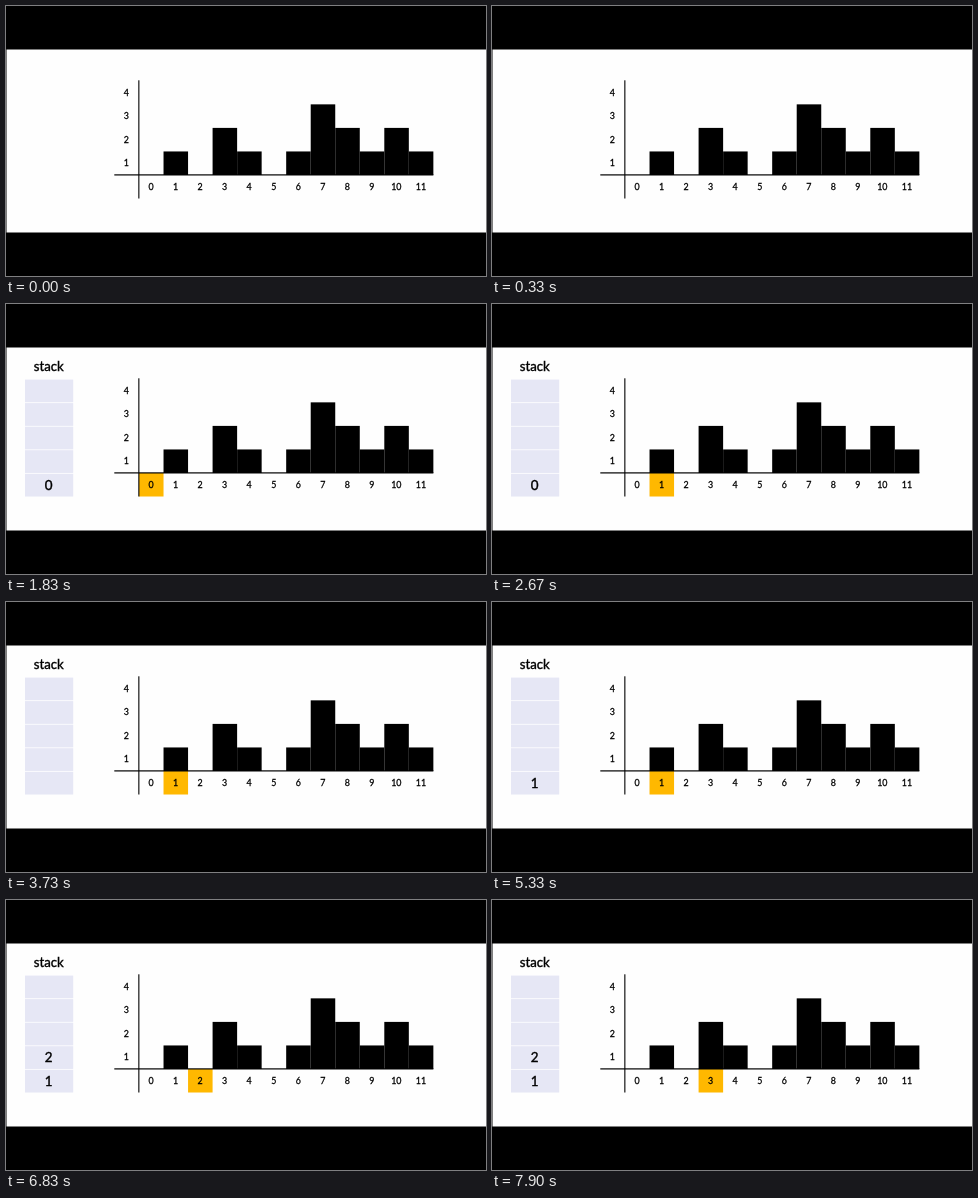
Recreate the animation shown at these times as an HTML page with a canvas. Size 480 px wide and 270 px high, loop 8 s.

```html
<!DOCTYPE html>
<html lang="en">
<head>
<meta charset="utf-8">
<style>
  html, body { margin: 0; width: 100%; height: 100%; overflow: hidden; background: #000; }
  canvas { display: block; }
</style>
</head>
<body>
<canvas id="stage" width="480" height="270"></canvas>
<script>
const ctx = document.getElementById('stage').getContext('2d');
const LOOP = 8000;
const CELL = 24.53, UNIT = 23.55, LEFT = 133, BASE = 169, FOOT = 192.5;
const heights = Array.from('010210132121', Number);
const beats = [500, 1630, 2400, 3570, 4730, 5830, 6830, 7900];

// Walks the columns with a stack of non-rising heights, one state per action
function* walk() {
  const stack = [];
  for (let i = 0; i < heights.length; i++) {
    yield { active: i, stack: [...stack] };
    while (stack.length && heights[stack.at(-1)] < heights[i]) {
      stack.pop();
      yield { active: i, stack: [...stack] };
    }
    stack.push(i);
    yield { active: i, stack: [...stack] };
  }
}
const states = [...walk()];

function box(x0, y0, x1, y1, color) {
  ctx.fillStyle = color;
  ctx.fillRect(x0, y0, x1 - x0, y1 - y0);
}

// The thin outline gives the text a medium weight
function label(text, x, y, size) {
  ctx.font = `${size}px Lato, Carlito, sans-serif`;
  ctx.fillStyle = ctx.strokeStyle = '#000';
  ctx.lineWidth = size / 35;
  ctx.fillText(text, x, y);
  ctx.strokeText(text, x, y);
}

function drawChart(active) {
  heights.forEach((h, i) => {
    const x = LEFT + i * CELL;
    if (h) box(x, BASE - h * UNIT, x + CELL, BASE, '#000');
    if (i === active) box(x, BASE, x + CELL, FOOT, '#ffb800');
    label(i, x + CELL / 2 - 0.2, 184, 8.9);
  });
  for (let v = 1; v <= 4; v++) label(v, 120.3, 183.7 - v * UNIT, 8.9);
  box(108.3, 168.3, LEFT + heights.length * CELL, 169.5, '#000');
  box(132.3, 74.3, 133.4, FOOT, '#000');
}

function drawStack(items) {
  label('stack', 42.7, 67.2, 13.2);
  for (let row = 0; row < 5; row++) {
    const bottom = FOOT - row * UNIT;
    box(19, bottom - UNIT + 0.8, 67.2, bottom, '#e6e7f5');
    if (row < items.length) label(items[row], 42.7, 186 - row * UNIT, 13.4);
  }
}

function draw(t) {
  const state = states[beats.filter(b => b <= t).length - 1];
  box(0, 0, 480, 270, '#000');
  box(0.5, 43.5, 480, 226.5, '#fefefe');
  ctx.textAlign = 'center';
  drawChart(state?.active);
  if (state) drawStack(state.stack);
}

const start = performance.now();
function frame() {
  draw((performance.now() - start) % LOOP);
  requestAnimationFrame(frame);
}
frame();
</script>
</body>
</html>
```
